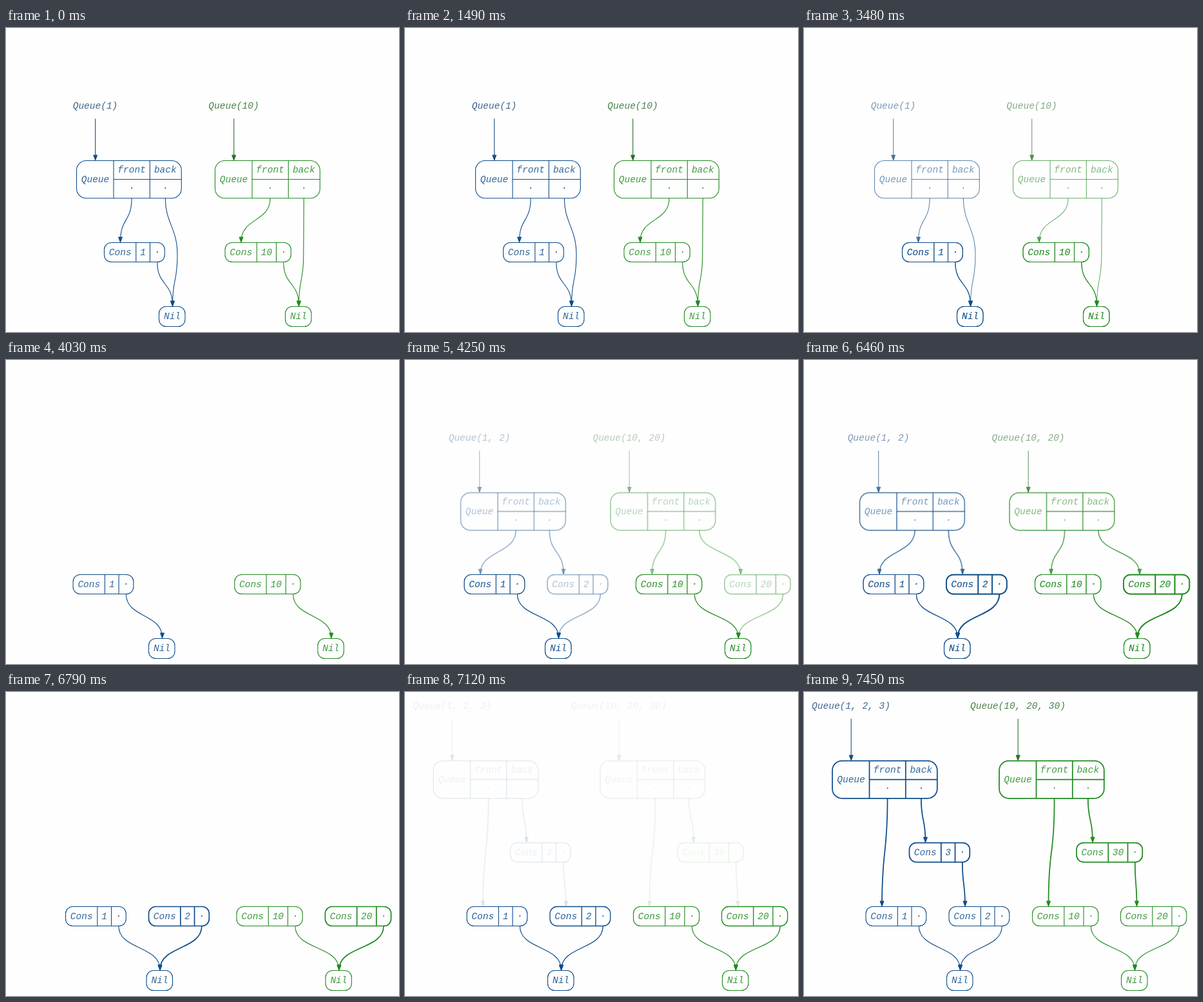
These frames come from a looping animation (610 px wide and 471 px high, 8 s). An HTML page with a canvas:

```html
<!DOCTYPE html>
<html lang="en">
<head>
<meta charset="utf-8">
<title>Persistent queue</title>
<style>
  html, body { margin: 0; overflow: hidden; background: #fefefe; }
  canvas { display: block; }
</style>
</head>
<body>
<canvas id="stage" width="610" height="471"></canvas>
<script>
const ctx = document.getElementById('stage').getContext('2d');
const LOOP = 8000, STEP = 110, STARTS = [3480, 6460];
const THIN = 1.1, MEDIUM = 1.3, BOLD = 1.75;
const TOP = 332.5, NIL_TOP = 431.5, CELL = 30;
const PALETTES = [
  { ink: '#104e8b', root: '#1e4c7a', unit: 1 },
  { ink: '#228b22', root: '#2c6c2c', unit: 10 }
];

// Left edges of the nodes, one entry per palette
const SCENES = [
  { top: 205.5, queue: [109.5, 324.5], cons: [[152.5], [340]], nil: [237.5, 433.5], via: [266, 461.8] },
  { top: 205.5, queue: [86.5, 319], cons: [[92, 221], [358.5, 496]], nil: [217.5, 496.5] },
  { top: 106.5, queue: [44, 303], cons: [[96, 225, 163.5], [354.5, 491.5, 423]], nil: [221.5, 492.5] }
];

const clamp = v => Math.min(1, Math.max(0, v));
const lerp = (a, b, p) => a + (b - a) * p;
const consTop = i => i === 2 ? TOP - 99 : TOP;
const consWidth = label => label.length > 1 ? 102.3 : 93.8;

function setColor(color) {
  ctx.strokeStyle = ctx.fillStyle = color;
}

// Slightly translucent, for a light type weight
function text(label, x, cy) {
  const alpha = ctx.globalAlpha;
  ctx.globalAlpha = alpha * 0.86;
  ctx.fillText(label, x, cy + 4.5);
  ctx.globalAlpha = alpha;
}

function dot(x, cy) {
  text('·', x, cy - 1.3);
}

function line(x1, y1, x2, y2) {
  ctx.beginPath();
  ctx.moveTo(x1, y1);
  ctx.lineTo(x2, y2);
  ctx.stroke();
}

function box(x, y, w, h, r, pen) {
  ctx.lineWidth = pen;
  ctx.beginPath();
  ctx.roundRect(x, y, w, h, r);
  ctx.stroke();
}

function curve(x1, y1, x2, y2) {
  const k = (y2 - y1) * 0.55;
  ctx.bezierCurveTo(x1, y1 + k, x2, y2 - k, x2, y2);
}

function edge(x1, y1, x2, y2, pen, via) {
  const end = y2 - 1.5, base = y2 - 8.5;
  ctx.lineWidth = pen;
  ctx.beginPath();
  ctx.moveTo(x1, y1);
  if (via) {
    const mid = y1 + 88;
    ctx.bezierCurveTo(x1, y1 + 38, via, y1 + 46, via, mid);
    curve(via, mid, x2, end);
  } else {
    curve(x1, y1, x2, end);
  }
  ctx.stroke();
  ctx.lineWidth = 1;
  ctx.beginPath();
  ctx.moveTo(x2 - 3, base);
  ctx.lineTo(x2 + 3, base);
  ctx.lineTo(x2, y2 - 0.5);
  ctx.closePath();
  ctx.fill();
  ctx.stroke();
}

function drawCons(x, y, label, pen) {
  const w = consWidth(label), split = x + 49.3, last = x + w - 22.8;
  box(x, y, w, CELL, 11, pen);
  line(split, y, split, y + CELL);
  line(last, y, last, y + CELL);
  text('Cons', x + 24.7, y + 15);
  text(label, (split + last) / 2, y + 15);
  dot(x + w - 11.5, y + 15);
}

function drawList(cons, nil, palette, penOf) {
  setColor(palette.ink);
  box(nil, NIL_TOP, 40.5, 31, 11, THIN);
  text('Nil', nil + 20.5, NIL_TOP + 15);
  cons.forEach((x, i) => {
    const label = String((i + 1) * palette.unit), pen = penOf(i), y = consTop(i);
    drawCons(x, y, label, pen);
    const [tx, ty] = i === 2 ? [cons[1] + 25, TOP] : [nil + 21, NIL_TOP];
    edge(x + consWidth(label) - 11.5, y + CELL, tx, ty, pen);
  });
}

function drawQueue(scene, side, palette, pen) {
  const x = scene.queue[side], y = scene.top, cons = scene.cons[side];
  const values = cons.map((_, i) => (i + 1) * palette.unit);
  setColor(palette.root);
  text(`Queue(${values.join(', ')})`, x + 29, y - 85.2);
  edge(x + 29.2, y - 65, x + 29.2, y, THIN);

  setColor(palette.ink);
  box(x, y, 162.8, 58.3, 15, pen);
  line(x + 57.5, y, x + 57.5, y + 58.3);
  line(x + 113.8, y, x + 113.8, y + 58.3);
  line(x + 57.5, y + 29, x + 162.8, y + 29);
  text('Queue', x + 29, y + 28.8);
  [['front', 85.6], ['back', 137.8]].forEach(([label, dx]) => {
    text(label, x + dx, y + 13.8);
    dot(x + dx, y + 43.5);
  });

  edge(x + 85.6, y + 58.3, cons[0] + 25, TOP, pen);
  const last = cons.length - 1;
  if (last) edge(x + 137.8, y + 58.3, cons[last] + 25, consTop(last), pen);
  else edge(x + 137.8, y + 58.3, scene.nil[side] + 21, NIL_TOP, pen, scene.via[side]);
}

// The newest cell of every later scene is emphasised
const penIn = scene => i => i > 0 && i === SCENES.indexOf(scene) ? BOLD : THIN;

function drawScene(scene, alpha) {
  if (alpha <= 0) return;
  ctx.globalAlpha = alpha;
  PALETTES.forEach((palette, side) => {
    drawList(scene.cons[side], scene.nil[side], palette, penIn(scene));
    drawQueue(scene, side, palette, scene === SCENES[0] ? THIN : BOLD);
  });
  ctx.globalAlpha = 1;
}

// Cells shared by both scenes slide from the old layout to the new one
function drawShared(from, to, p) {
  PALETTES.forEach((palette, side) => {
    const cons = from.cons[side].map((x, i) => lerp(x, to.cons[side][i], p));
    const nil = lerp(from.nil[side], to.nil[side], p);
    drawList(cons, nil, palette, i => penIn(from)(i) === BOLD ? lerp(BOLD, MEDIUM, p) : THIN);
  });
}

function render(t) {
  ctx.fillStyle = '#fefefe';
  ctx.fillRect(0, 0, 610, 471);
  ctx.font = 'italic 14.5px "Liberation Mono", monospace';
  ctx.textAlign = 'center';

  const index = STARTS.filter(start => t >= start).length;
  const step = index ? Math.floor((t - STARTS[index - 1]) / STEP) + 1 : 10;
  const to = SCENES[index];
  if (step >= 10) return drawScene(to, 1);

  const from = SCENES[index - 1];
  drawShared(from, to, clamp((step - 3.6) / 3));
  drawScene(from, clamp(1 - step / 3));
  drawScene(to, clamp((step - 6.7) / 3.3));
}

const begin = performance.now();
function tick() {
  render((performance.now() - begin) % LOOP);
  requestAnimationFrame(tick);
}
tick();
</script>
</body>
</html>
```
